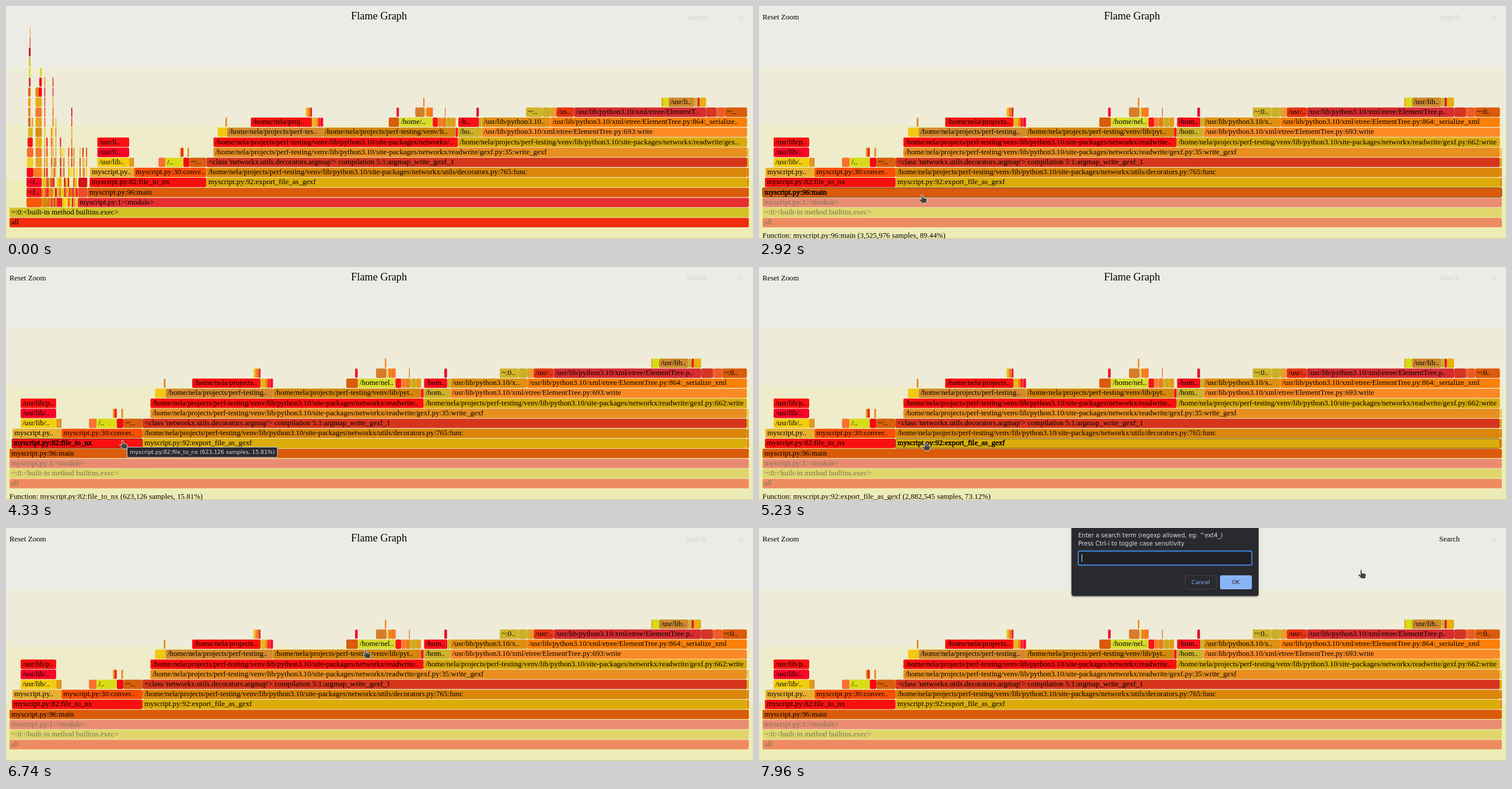
Write an HTML page that moves like this. It is 1280 px wide and 399 px high and loops after 8000 ms.

```html
<!DOCTYPE html>
<html lang="en">
<head>
<meta charset="utf-8">
<title>Flame Graph</title>
<style>
  html, body { margin: 0; height: 100%; overflow: hidden; }
  body { background: linear-gradient(#ecece6 105px, #eeecd8 105px 203px, #eeecc9 203px 300px, #eeecb6 300px); }
  svg { display: block; width: 1280px; height: 399px; }
  text { font: 12.885px "Liberation Serif", "Times New Roman", serif; }
  .title { font-size: 18.25px; text-anchor: middle; }
  .dim { opacity: .5; }
  .hot { stroke: #000; stroke-width: .54px; }
  .ui text { font: 10px "DejaVu Sans", Verdana, sans-serif; fill: #dcdde0; }
  .ui .tip { font-size: 9.3px; fill: #d6d7d9; }
  .ui .button { font-size: 9.4px; text-anchor: middle; }
  #dialog { filter: drop-shadow(0 1px 1.5px rgba(0, 0, 0, .45)); }
</style>
</head>
<body>
<svg viewBox="0 0 1280 399">
  <rect y="398" width="1280" height="1" fill="#c9c58f"/>
  <text class="title" x="639.2" y="23">Flame Graph</text>
  <text id="reset" x="6" y="23">Reset Zoom</text>
  <text id="search" x="1165.6" y="23">Search</text>
  <text x="1255.8" y="23" opacity=".08">ic</text>
  <g id="full"></g>
  <g id="zoomed"></g>
  <text id="details" x="6" y="397.3"></text>
  <g id="tips" class="ui"></g>
  <g id="dialog" class="ui">
    <path d="M535.5 -5H856V112.500q0 4 -4 4H539.500q-4 0 -4 -4z" fill="#292a2d"/>
    <text x="547" y="16">Enter a search term (regexp allowed, eg: ^ext4_)</text>
    <text x="547" y="30">Press Ctrl-i to toggle case sensitivity</text>
    <rect x="547" y="39.500" width="297.500" height="24" rx="1.500" fill="#202124" stroke="#4486e4" stroke-width="1.800"/>
    <rect x="552.800" y="45" width="1" height="13" fill="#e0e1e3"/>
    <rect x="730.500" y="81.500" width="53.500" height="23" rx="2.500" fill="none" stroke="#3f4145"/>
    <text class="button" x="757" y="96" style="fill:#8ab4f8">Cancel</text>
    <rect x="790" y="81" width="54.500" height="24" rx="2.500" fill="#8ab4f8"/>
    <text class="button" x="817" y="96" style="fill:#202124">OK</text>
  </g>
  <path id="hand" fill="#444" stroke="#e9e9e4" stroke-width=".9" d="M-1.300 1.400Q-1.200 0 0 0Q1.300 0 1.400 1.400L1.700 5.600L7 6.600Q8.800 7.100 8.600 9.200L8 13.500Q7.700 15.200 6.300 15.200H1.600Q.6 15.200 -.2 14.200L-4.400 9.700Q-5.200 8.500 -4 7.800Q-3 7.400 -2 8.200L-.9 9.200Z"/>
</svg>
<script>
const LOOP = 8000, PITCH = 17.18, BASE = 362.8;
const LEFT = 6, RIGHT = 1273, FOCUS = 139.5, FOCUS_DEPTH = 3;
const HOME = '/home/nela/';
const PERF = HOME + 'projects/perf-testing/venv/';
const SITE = PERF + 'lib/python3.10/site-packages/networkx/';
const XML = '/usr/lib/python3.10/xml/etree/ElementT';
const MAIN = 'myscript.py:96:main', FILE = 'myscript.py:82:file_to_nx', EXPORT = 'myscript.py:92:export_file_as_gexf';

const $ = id => document.getElementById(id);
const full = $('full'), zoomed = $('zoomed');
const hotBars = {};

function add(parent, tag, attrs, text = '') {
  const el = document.createElementNS('http://www.w3.org/2000/svg', tag);
  for (const key in attrs) el.setAttribute(key, attrs[key]);
  el.textContent = text;
  return parent.appendChild(el);
}

function drawBar(parent, depth, x1, x2, fill, label, dim) {
  const y = BASE - depth * PITCH;
  const g = add(parent, 'g', dim ? { class: 'dim' } : {});
  const width = Math.max(x2 - x1 - .15, .6);
  add(g, 'rect', { x: x1, y, width, height: 16.1, rx: Math.min(2.1, width / 2), fill });
  if (label) {
    add(g, 'text', { x: x1 + 3.2, y: y + 11.27 }, label);
    (hotBars[label] ||= []).push(g);
  }
}

const zoomX = x => LEFT + (x - FOCUS) * (RIGHT - LEFT) / (RIGHT - FOCUS);

// Label holds the wide-view text and, after a bar sign, the zoomed one.
function bar(depth, x1, x2, fill, label = '') {
  const [near, far = near] = label.split('|');
  drawBar(full, depth, x1, x2, fill, near);
  if (depth <= FOCUS_DEPTH && x2 === RIGHT) {
    drawBar(zoomed, depth, LEFT, RIGHT, fill, far, depth < FOCUS_DEPTH);
  } else if (x1 > FOCUS) {
    drawBar(zoomed, depth, zoomX(x1), zoomX(x2), fill, far);
  }
}

// Touching bars: start x, then end x, colour and optional label of each.
function run(depth, x, ...parts) {
  for (const [end, fill, label] of parts) {
    bar(depth, x, end, fill, label);
    x = end;
  }
}

let seed = 11;
function random() {
  seed = (seed * 16807) % 2147483647;
  return seed / 2147483647;
}
const hot = () => `rgb(${205 + 50 * random() | 0},${230 * random() | 0},${55 * random() | 0})`;

run(0, LEFT, [RIGHT, '#f02d0e', 'all']);
run(1, LEFT, [RIGHT, '#d3c124', '~:0:<built-in method builtins.exec>']);
run(2, 35, [61.5, '#fa570a'], [72, '#d9860c']);
run(2, 123, [RIGHT, '#e62e2f', 'myscript.py:1:<module>']);
run(3, 35, [61.5, '#f0161e', '<f..']);
run(3, 123.5, [FOCUS, '#ee4a26'], [RIGHT, '#da5b0a', MAIN]);
run(4, 35, [61.5, '#f80a28', '<f..']);
run(4, 124, [139.4, '#d21414']);
run(4, 143.2, [343.5, '#f9100e', FILE], [1270, '#dbac0a', EXPORT], [1273, '#de8012']);
run(5, 35.5, [47, '#f40c1c'], [61.5, '#f87e22']);
run(5, 144, [219.2, '#e8b02e', 'myscript.py..'],
  [343.5, '#fa4f07', 'myscript.py:30:conve..|myscript.py:30:conver..'],
  [1270, '#da860a', SITE + 'utils/decorators.py:765:func'], [1273, '#d8800c']);
run(6, 156.5, [211.2, '#f3cd10', '/usr/lib..|/usr/lib/..'], [216.8, '#e29a14'], [219.3, '#dc8410']);
run(6, 261.3, [273, '#fb7030'], [304, '#d8dc18', '/..'], [314, '#f40812'],
  [343.5, '#d8600c', '~:..'],
  [1270, '#d6351c', "<class 'networkx.utils.decorators.argmap'> compilation 5:1:argmap_write_gexf_1"],
  [1273, '#d8b010']);
run(7, 156.5, [211.2, '#fb0528', '/usr/li..|/usr/lib/..']);
run(7, 298, [300, '#e6a012'], [304.2, '#f02a12']);
run(7, 311, [313.6, '#e08a12']);
run(7, 355.5, [1270, '#e88f20', SITE + 'readwrite/gexf.py:35:write_gexf'], [1273, '#e8cc60']);
run(8, 156.5, [211.2, '#fa1012', '/usr/li..|/usr/lib/p..']);
run(8, 355.5, [774.5, '#fa100e', SITE + '..|' + SITE + 'readwrite..'],
  [1270, '#d8aa0c', SITE + 'readwrite/gex..|' + SITE + 'readwrite/gexf.py:662:write']);
run(9, 362.7, [378.8, '#f2c812'],
  [543.3, '#d48a2c', HOME + 'projects/perf-tes..|' + HOME + 'projects/perf-testing..'],
  [770.4, '#d6860c', PERF + 'li..|' + PERF + 'lib/pyt..'], [774.5, '#fa1020'],
  [815.5, '#cbb228', '/ho..|/hom..'], [1270, '#fa8a26', XML + 'ree.py:693:write']);
run(10, 376, [378.7, '#e08a20']);
run(10, 419.5, [524.3, '#fa1010', HOME + 'proj..|' + HOME + 'projects..'],
  [531.4, '#e8b818'], [534.6, '#f08018'], [539, '#fa2a14'], [543.6, '#f80a30']);
run(10, 655.8, [673.6, '#da5b0a'], [731.2, '#d8dc2c', '/home/..|/home/nel..'],
  [740, '#f81414'], [747, '#fa7a2c'], [754, '#e87e18'], [756, '#c8b428'], [763, '#d0a81c'], [770.6, '#e49c18']);
run(10, 775, [810.8, '#f8101c', '/h..|/hom..'], [815.5, '#c8b028'],
  [933.2, '#e09010', '/usr/lib/python3.10..|/usr/lib/python3.10/x..'],
  [1270, '#fa8008', XML + 'ree.py:864:_serialize..|' + XML + 'ree.py:864:_serialize_xml']);
run(11, 513.6, [516.4, '#f0c418'], [519, '#f08a18'], [522, '#f06a14'], [524.3, '#d81420']);
run(11, 669.3, [673.4, '#f01028']);
run(11, 701.3, [717.6, '#d87c2a']);
run(11, 718.6, [721, '#e8c018'], [724, '#e87820'], [730.4, '#fa7a10'], [731.4, '#f02a14']);
run(11, 752, [753.2, '#e85a20']);
run(11, 806, [810.4, '#de1430']);
run(11, 891, [920, '#d0b42a', '~:..|~:0..'], [933, '#cab024'], [943, '#e4a02c'],
  [973.6, '#e83412', '/us..|/usr/..'], [1199.8, '#d62c30', XML + '..|' + XML + 'ree.p..'],
  [1217.6, '#d63422'], [1219.8, '#d85020'], [1232, '#ee5a28'], [1270, '#da5b0a', '~:..|~:0..']);
run(12, 715, [717.2, '#fa7a12']);
run(12, 1123.4, [1126, '#f89a12'], [1135.2, '#d2e010'], [1180, '#ce8a2e', '/usr/li..|/usr/lib..'],
  [1185, '#c8b230'], [1188.8, '#ea1a1a'], [1199.8, '#e8b010']);

// Narrow towers at the left edge.
run(6, 36, [47, '#f0d022']);
run(7, 36, [47, '#fa6a2e']);
run(8, 37, [46, '#fa1212']);
run(9, 38, [46, '#d8b81c']);
for (let d = 6; d < 14; d++) bar(d, 50.5, 61.5, ['#e8a41c', '#f07a2c', '#e8ac10', '#da8a14'][(d + 2) % 4]);
bar(13, 56, 61.5, '#fa0528');
run(14, 57, [61.5, '#f01018']);
run(15, 58, [61.5, '#d8dc20']);
for (let d = 10; d < 14; d++) {
  bar(d, 38, 42.3, ['#f2a010', '#da6a12', '#e88a24'][d % 3]);
  if (d < 11) bar(d, 44, 46.5, '#e0a028');
}
['#da2a34', '#dce41c', '#d2c424', '#d01420'].forEach((fill, i) => bar(14 + i, 39.2, 42.3, fill));
run(18, 40.8, [42.2, '#e8401c']);
run(19, 40.8, [42.2, '#f0a030']);
for (const d of [2, 3, 4]) {
  for (let x = d === 2 ? 72 : 61.6; x < 122;) {
    const end = Math.min(x + 1.6 + 2.4 * random(), 123);
    if (d < 4 || random() < .85) bar(d, x, end, hot());
    x = end;
  }
}
const spikes = [
  [62, 3, 5], [65.7, 1.7, 14], [69, 2.5, 8], [77, 2, 9], [79.7, 1.8, 14], [82.5, 1.8, 6],
  [84.8, 1.5, 10], [92.5, 2, 8], [95, 1.5, 7], [98.3, 2, 7], [106.5, 2, 7], [109, 1.5, 5],
  [111.8, 1.9, 11], [115.3, 2.3, 7], [120, 2, 5], [126, 2, 7], [131, 2, 7], [133.5, 1.5, 6], [137, 2.2, 7]
];
for (const [x, w, top] of spikes) {
  for (let d = 5; d <= top; d++) bar(d, x, x + w, hot());
}

function tip(x, y, width, text) {
  const g = add($('tips'), 'g', {});
  add(g, 'rect', { x: x + .5, y: y + .5, width, height: 17.5, fill: '#292b2f', stroke: '#c9cacb' });
  add(g, 'text', { class: 'tip', x: x + 5.5, y: y + 12.4 }, text);
  return g;
}

const count = {
  [MAIN]: MAIN + ' (3,525,976 samples, 89.44%)',
  [FILE]: FILE + ' (623,126 samples, 15.81%)',
  [EXPORT]: EXPORT + ' (2,882,545 samples, 73.12%)'
};
const fileTip = tip(207, 308, 257.5, count[FILE]);
const exportTip = tip(322, 312.5, 312.5, count[EXPORT]);

// Pointer moves: first step, last step, number of steps, end x, end y.
const moves = [
  [590, 1300, 8, 222, 312], [1400, 1700, 4, 231.5, 319], [1800, 2100, 4, 278, 322.5],
  [2300, 2300, 1, 279, 322.5], [3210, 3320, 2, 251, 327], [3610, 3810, 3, 199.5, 297],
  [4030, 4030, 1, 199.5, 296.5], [5030, 5320, 4, 313, 300.5], [5530, 5630, 2, 313.5, 301],
  [6240, 6240, 1, 336, 300.5], [6530, 7330, 9, 1176, 23], [7450, 7450, 1, 1176, 21],
  [7750, 7960, 3, 1031.5, 71.5]
];

function pointer(t) {
  let x = 155, y = 405;
  for (const [from, to, steps, endX, endY] of moves) {
    if (t < from) break;
    const gap = steps > 1 ? (to - from) / (steps - 1) : 1;
    const part = Math.min(Math.floor((t - from) / gap + 1e-6) + 1, steps) / steps;
    x += (endX - x) * part;
    y += (endY - y) * part;
  }
  return [x, y];
}

function hovered(t) {
  if (t < 1400 || t >= 6530) return '';
  return t < 3710 ? MAIN : t < 5120 ? FILE : EXPORT;
}

const show = (el, on) => { el.style.display = on ? '' : 'none'; };

function draw(now) {
  const t = now % LOOP, zoom = t >= 2920, name = hovered(t);
  show(full, !zoom);
  show(zoomed, zoom);
  show($('reset'), zoom);
  show(fileTip, t >= 4330 && t < 5030);
  show(exportTip, t >= 5630 && t < 6530);
  show($('dialog'), t >= 7750);
  $('search').style.opacity = t >= 7450 ? 1 : .1;
  for (const key in count) {
    hotBars[key].forEach(g => g.classList.toggle('hot', key === name));
  }
  $('details').textContent = name && 'Function: ' + count[name];
  $('hand').setAttribute('transform', `translate(${pointer(t)})`);
}

const start = performance.now();
function tick() {
  draw(performance.now() - start);
  requestAnimationFrame(tick);
}
tick();
</script>
</body>
</html>
```
